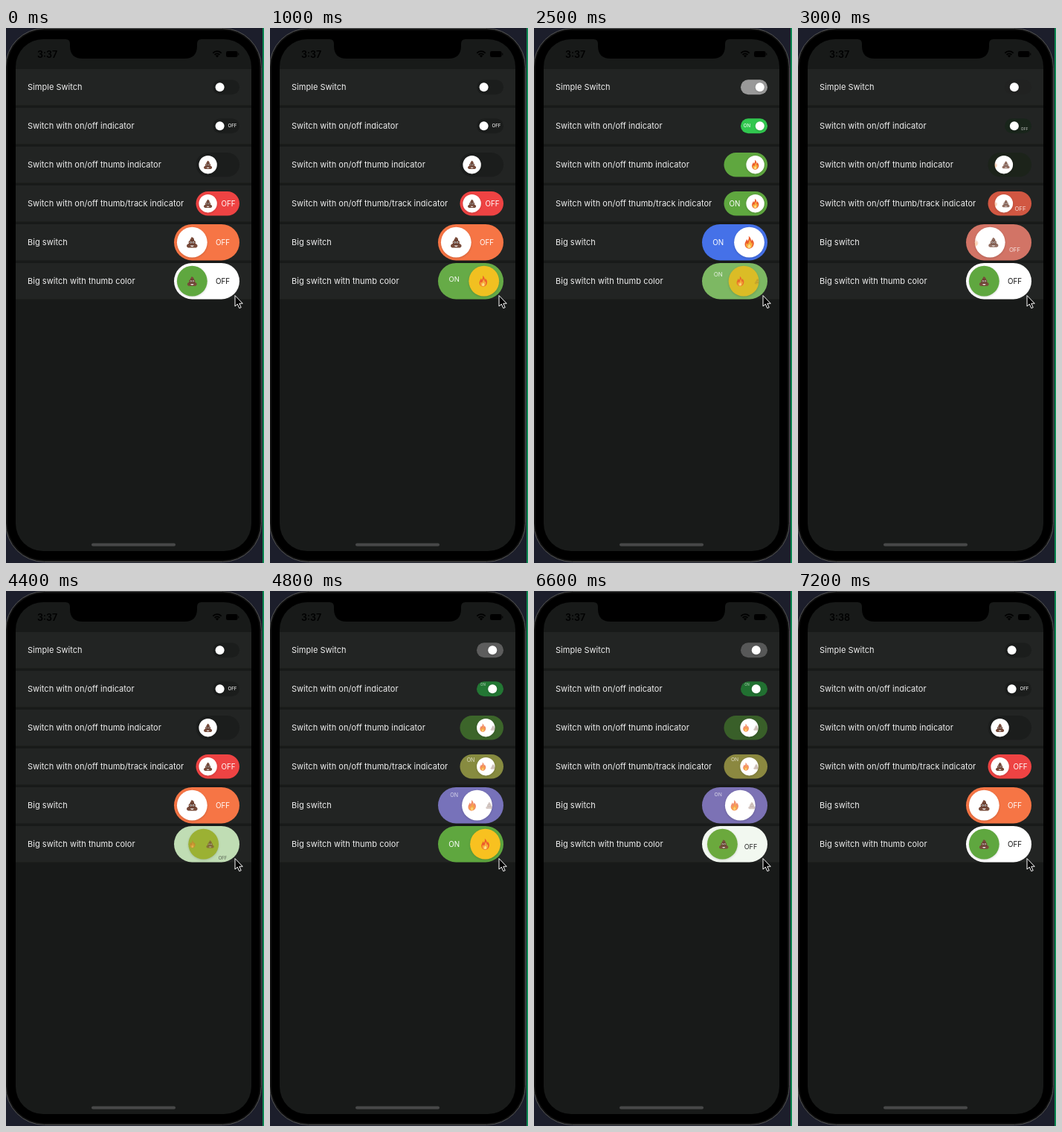
Write an HTML page with a canvas that moves like this. It is 347x717 px and loops after 7500 ms.

```html
<!DOCTYPE html>
<html lang="en">
<head>
<meta charset="utf-8">
<title>Switches</title>
<style>
html, body { margin: 0; width: 100%; height: 100%; overflow: hidden; background: #1c1e2b; }
canvas { display: block; width: 347px; height: 717px; }
</style>
</head>
<body>
<canvas id="stage" width="347" height="717"></canvas>
<script>
const ctx = document.getElementById('stage').getContext('2d');
const LOOP = 7500, STEP = 100;
const FONT = 'Inter, Roboto, sans-serif';
// Colours are [r, g, b, alpha].
const SHADE = [0, 0, 0, 0.2], WHITE = [255, 255, 255, 1], GREEN = [95, 167, 63, 1];

// Each toggle: start of the last switch, delay and duration of the others.
const toggles = [
  { start: 605, lag: 495, span: 700 },
  { start: 2450, lag: 275, span: 500 },
  { start: 4290, lag: 275, span: 500 },
  { start: 6240, lag: 275, span: 500 }
];

const small = { x: 278, w: 36, h: 20, r: 6, from: 287.6, to: 303.8 };
const medium = { x: 255.5, w: 58.5, h: 32.5, r: 12.2, from: 271.6, to: 297.6, icon: 13 };
const big = { x: 226, w: 88, h: 48.5, r: 20.4, from: 250.3, to: 289.5, icon: 17 };

const rows = [
  { label: 'Simple Switch', ...small, off: SHADE, on: [153, 153, 153, 1] },
  { label: 'Switch with on/off indicator', ...small, off: SHADE, on: [49, 199, 79, 1],
    text: { size: 6.2, onX: 286.5, offX: 304.5 } },
  { label: 'Switch with on/off thumb indicator', ...medium, off: SHADE, on: GREEN },
  { label: 'Switch with on/off thumb/track indicator', ...medium, off: [238, 67, 67, 1], on: GREEN,
    text: { size: 9.8, onX: 270, offX: 299 } },
  { label: 'Big switch', ...big, off: [246, 117, 69, 1], on: [69, 113, 232, 1],
    text: { size: 9.8, onX: 247.7, offX: 291.5 } },
  { label: 'Big switch with thumb color', ...big, icon: 15, off: WHITE, on: GREEN,
    thumbOff: GREEN, thumbOn: [248, 193, 32, 1], offText: '#111', lead: true,
    text: { size: 9.8, onX: 247.7, offX: 291.5 } }
];

const clamp = v => Math.max(0, Math.min(1, v));
const easeOut = v => 1 - (1 - clamp(v)) ** 2;
const mix = (a, b, p) => `rgba(${a.map((v, i) => v + (b[i] - v) * p).join(',')})`;

function progress(t, lead) {
  return toggles.reduce((sum, { start, lag, span }, i) => {
    const e = lead ? easeOut((t - start) / 500) : easeOut((t - start - lag) / span);
    return sum + (i % 2 ? -e : e);
  }, 0);
}

function box(x, y, w, h, r, fill) {
  ctx.beginPath();
  ctx.roundRect(x, y, w, h, r);
  if (fill) {
    ctx.fillStyle = fill;
    ctx.fill();
  }
}

function disc(x, y, r, fill) {
  ctx.beginPath();
  ctx.arc(x, y, r, 0, Math.PI * 2);
  ctx.fillStyle = fill;
  ctx.fill();
}

function shape(path, fill) {
  ctx.fillStyle = fill;
  ctx.fill(new Path2D(path));
}

function text(str, x, y, size, fill, weight = 400, align = 'left') {
  ctx.font = `${weight} ${size}px ${FONT}`;
  ctx.textAlign = align;
  ctx.fillStyle = fill;
  ctx.fillText(str, x, y);
}

// Icons are drawn in a unit box of 20 around the origin.
function fire() {
  shape('M-1 -10C2 -8 3 -5 3 -2C4 -3 4 -4 4 -5C7 -2 8 1 7 4C6 8 3 10 0 10C-4 10 -7 7 -7 3C-7 0 -5 -2 -4 -5C-3 -4 -3 -3 -3 -2C-1 -4 0 -7 -1 -10Z', '#ec5b2b');
  shape('M0 -4C3 -1 3 0 3 2C4 1 4 1 4.500 0C6 4 4 9.500 0 9.500C-5 9.500 -6 5 -4.500 1C-4 2 -3 3 -2.500 3C-1 1 0 0 0 -4Z', '#f8b03c');
  shape('M0 3C3 5 3 9 0 9C-3 9 -3 6 0 3Z', '#fde08a');
}

function poop() {
  shape('M-1 -9C2 -8 4 -6 3 -3.500C5.500 -3 6 -1 5 1.500C9 2 10 7 6 8H-6C-10 7 -9 2 -5 1.500C-6 -1 -5.500 -3 -3 -3.500C-4 -6 -1 -6 -1 -9Z', '#774a39');
  ctx.strokeStyle = '#54322a';
  ctx.lineWidth = 1;
  ctx.stroke(new Path2D('M-3 -3.500Q0 -2 3 -4M-5 2Q0 4 5 2'));
  for (const x of [-2, 2]) {
    disc(x, -0.5, 1.4, '#eee');
    disc(x, -0.5, 0.8, '#222');
  }
  shape('M-3 4.500H3Q2 6.500 0 6.500Q-2 6.500 -3 4.500Z', '#eee');
}

function icon(draw, x, y, size, q) {
  if (q < 0.01) return;
  ctx.save();
  ctx.translate(x, y);
  const k = size / 20 * (0.5 + 0.5 * q);
  ctx.scale(k, k);
  ctx.globalAlpha = q;
  draw();
  ctx.restore();
}

function trackText(str, x, y, size, fill, q) {
  if (q < 0.02) return;
  ctx.save();
  ctx.globalAlpha = q;
  ctx.translate(x, y);
  ctx.scale(q, q);
  text(str, 0, size * 0.36, size, fill, 400, 'center');
  ctx.restore();
}

function drawSwitch(s, y, p) {
  const x = s.from + (s.to - s.from) * p;
  ctx.save();
  box(s.x, y - s.h / 2, s.w, s.h, s.h / 2, mix(s.off, s.on, p));
  ctx.clip();
  if (s.text) {
    const { size, onX, offX } = s.text;
    trackText('ON', onX, y - s.h * (1 - p), size, '#fff', p);
    trackText('OFF', offX, y + s.h * p, size, s.offText || '#fff', 1 - p);
  }
  ctx.shadowColor = 'rgba(0,0,0,.16)';
  ctx.shadowBlur = 3;
  ctx.shadowOffsetY = 1;
  disc(x, y, s.r, mix(s.thumbOff || WHITE, s.thumbOn || WHITE, p));
  ctx.shadowColor = 'transparent';
  if (s.icon) {
    ctx.clip();
    icon(fire, x - s.r * 1.2 * (1 - p), y, s.icon, p);
    icon(poop, x + s.r * 1.12 * p, y + 0.5, s.icon, 1 - p);
  }
  ctx.restore();
}

function drawPhone() {
  ctx.fillStyle = '#1c1e2b';
  ctx.fillRect(0, 0, 347, 717);
  ctx.fillStyle = '#0b8550';
  ctx.fillRect(345, 0, 2, 717);
  box(-0.5, 0.5, 344, 715, 52, '#111');
  ctx.strokeStyle = '#555656';
  ctx.lineWidth = 1;
  ctx.stroke();
  box(2, 3, 339, 710, 49, '#000');
  box(13, 15, 317, 686, 37, '#181a19');
}

function drawNotch() {
  shape('M80 14H263V15Q257 15 257 21V24Q257 41 240 41H103Q86 41 86 24V21Q86 15 80 15Z', '#000');
}

function drawStatus(t) {
  text(t < 7200 ? '3:37' : '3:38', 42, 39.5, 12.5, '#000', 600);
  ctx.strokeStyle = '#000';
  ctx.lineWidth = 1.8;
  for (const r of [4.7, 7.8]) {
    ctx.beginPath();
    ctx.arc(284, 39, r, -Math.PI * 0.76, -Math.PI * 0.24);
    ctx.stroke();
  }
  shape('M284 39.500L281.800 37Q284 35.300 286.200 37Z', '#000');
  box(296, 31, 15.5, 8, 2.3, '#000');
  box(312.3, 33.5, 1, 3, 0.5, '#000');
}

function drawCursor() {
  const arrow = new Path2D('M308 358.500V373L311.300 370L313.800 375.500L316.200 374.500L313.800 369.200H318.300Z');
  ctx.fillStyle = '#000';
  ctx.fill(arrow);
  ctx.strokeStyle = '#fff';
  ctx.lineWidth = 1;
  ctx.stroke(arrow);
}

function draw(t) {
  drawPhone();
  rows.forEach((row, i) => {
    const y = 79 + i * 52;
    ctx.fillStyle = '#222423';
    ctx.fillRect(13, y - 24, 317, 48.5);
    ctx.letterSpacing = '0.03px';
    text(row.label, 29, y + 4, 11, '#eee');
    ctx.letterSpacing = '0px';
    drawSwitch(row, y + 0.2, progress(t, row.lead));
  });
  drawStatus(t);
  drawNotch();
  box(115, 690.4, 113, 4, 2, '#474848');
  drawCursor();
}

const begin = performance.now();
function tick() {
  const t = (performance.now() - begin) % LOOP;
  draw(Math.floor(t / STEP) * STEP);
  requestAnimationFrame(tick);
}
tick();
</script>
</body>
</html>
```
